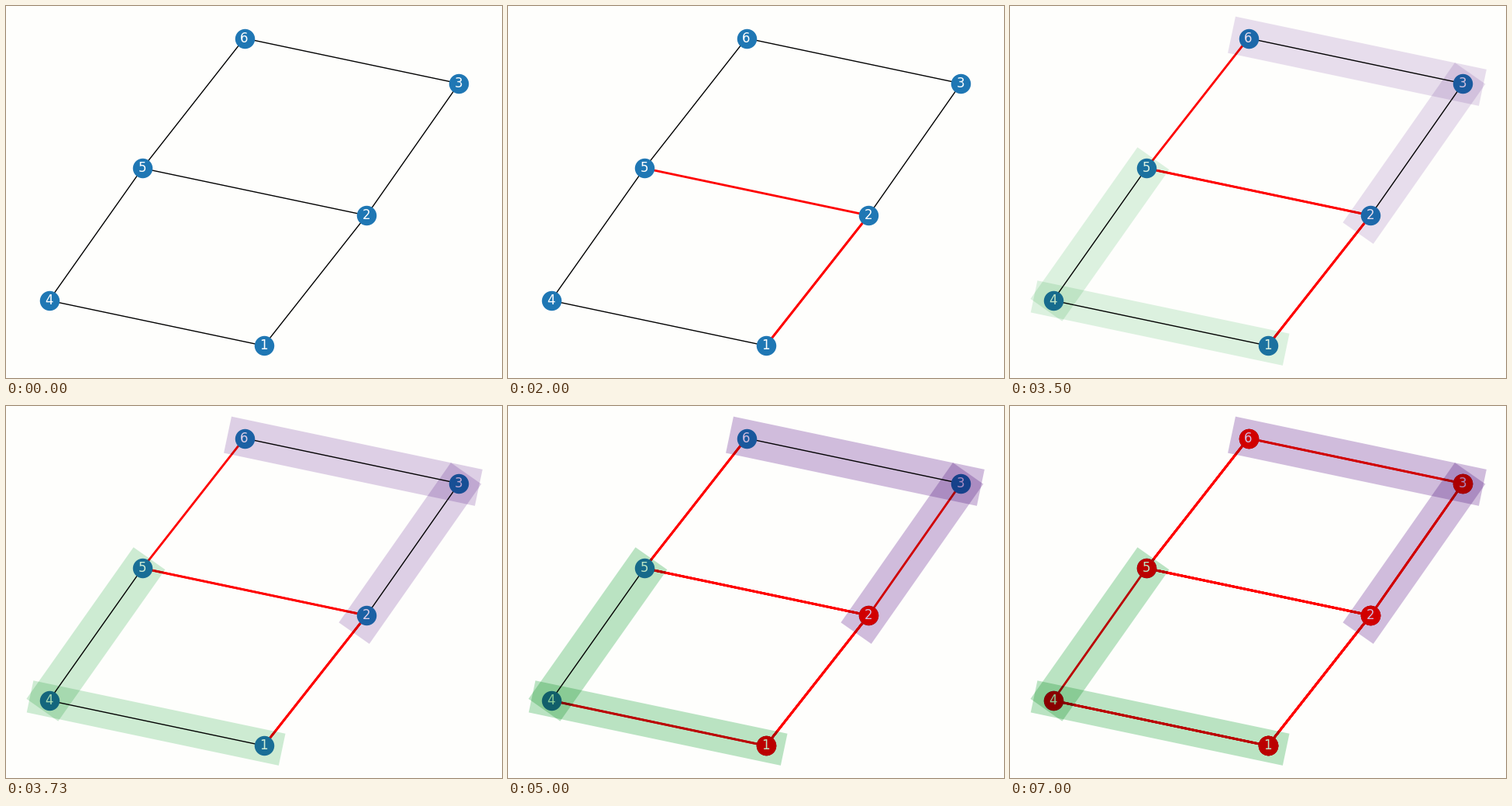
A matplotlib script that plays this animation: 640 px wide and 480 px high, repeating every 8000 ms.

```python
from itertools import combinations

import matplotlib.pyplot as plt
import numpy as np
from matplotlib.animation import FuncAnimation
from matplotlib.collections import LineCollection
from matplotlib.patches import Polygon

WIDTH, HEIGHT, DPI = 640, 480, 100
LOOP_MS, STEP_MS = 8000, 20
FADE_START, FADE_MS = 3000, 1000

PAPER, BLUE, GREEN, PURPLE = (np.array(rgb) / 255 for rgb in (
    (254, 254, 252), (31, 119, 180), (187, 228, 196), (209, 189, 223)))
RED, BLACK, WHITE = np.array([1, 0, 0]), np.zeros(3), np.ones(3)

NODES = {1: (332.7, 438.35), 2: (465.2, 270.2), 3: (584.46, 100),
         4: (55.54, 380), 5: (176, 209.4), 6: (307.55, 41.65)}

# One edge turns red each second, in this order.
EDGES = [(1, 2), (2, 5), (5, 6), (4, 1), (2, 3), (6, 3), (4, 5)]
EDGE_START = {edge: k for k, edge in enumerate(EDGES, 1)}
# A node turns red together with the last of its edges.
NODE_START = {n: max(EDGE_START[e] for e in EDGES if n in e) for n in NODES}

# Highlighter bands along edges: tint, width, overhang at either end.
BANDS = {(4, 1): (GREEN, 42, 25, 24), (4, 5): (GREEN, 50, 15, 15.5),
         (6, 3): (PURPLE, 48, 22, 26), (2, 3): (PURPLE, 48, 28, 16)}

fig = plt.figure(figsize=(WIDTH / DPI, HEIGHT / DPI), dpi=DPI, facecolor=PAPER)
ax = fig.add_axes([0, 0, 1, 1])
ax.set(xlim=(0, WIDTH), ylim=(HEIGHT, 0))
ax.axis("off")


def multiply(color, bands, fade):
    """Colour seen through the given bands, as with a highlighter pen."""
    for band in bands:
        color = color * (1 - fade * (1 - BANDS[band][0]))
    return color


def add_band(band, zorder):
    _, width, before, after = BANDS[band]
    start, end = (np.array(NODES[n]) for n in band)
    along = (end - start) / np.hypot(*(end - start))
    side = along[::-1] * (-1, 1) * width / 2
    start, end = start - along * before, end + along * after
    corners = [start - side, end - side, end + side, start + side]
    return ax.add_patch(Polygon(corners, lw=0, zorder=zorder))


def add_lines(zorder, clip=None):
    lines = LineCollection([], zorder=zorder)
    ax.add_collection(lines, autolim=False)
    if clip is not None:
        lines.set_clip_path(clip)
    return lines


def set_lines(lines, edges, second, bands=(), fade=0):
    """Thin black edges, with one red stroke more for every second passed."""
    red = [e for e in edges for _ in range(second - EDGE_START[e] + 1)]
    lines.set_segments([[NODES[a], NODES[b]] for a, b in edges + red])
    lines.set_linewidths([1] * len(edges) + [2] * len(red))
    lines.set_color([BLACK] * len(edges)
                    + [multiply(RED, bands, fade)] * len(red))


base_lines = add_lines(1)
shapes = {band: add_band(band, 2) for band in BANDS}
patches = [(shape, [band]) for band, shape in shapes.items()]
inner_lines = [(add_lines(3, shape), [e for e in EDGES if set(e) & set(band)],
                [band]) for band, shape in shapes.items()]

# Where two bands meet at a node, both tints apply.
for pair in combinations(BANDS, 2):
    a, b = pair
    if set(a) & set(b):
        overlap = add_band(a, 4)
        overlap.set_clip_path(shapes[b])
        patches.append((overlap, pair))
        inner_lines += [(add_lines(5, shapes[b]), [a], pair),
                        (add_lines(5, shapes[a]), [b], pair)]


def add_node(n):
    """Blue dot, red dot, label and the bands that cover them."""
    x, y = NODES[n]
    blue, red = (ax.scatter(x, y, s=300, zorder=z) for z in (6, 7))
    label = ax.text(x, y, str(n), size=12, family="DejaVu Sans",
                    ha="center", va="center", zorder=8)
    return blue, red, label, [band for band in BANDS if n in band]


node_artists = {n: add_node(n) for n in NODES}


def update(i):
    t = i * STEP_MS
    second = t // 1000
    fade = min(max((t - FADE_START) / FADE_MS, 0), 1)

    set_lines(base_lines, EDGES, second)
    for patch, bands in patches:
        patch.set_visible(fade > 0)
        patch.set_facecolor(multiply(PAPER, bands, fade))
    for lines, edges, bands in inner_lines:
        lines.set_visible(fade > 0)
        set_lines(lines, edges, second, bands, fade)

    for n, (blue, red, label, bands) in node_artists.items():
        blue.set_color(multiply(BLUE, bands, fade))
        red.set_color(multiply(RED, bands, fade))
        label.set_color(multiply(WHITE, bands, fade))
        strokes = second - NODE_START[n] + 1
        red.set_visible(strokes > 0)
        red.set_offsets([NODES[n]] * max(strokes, 1))


anim = FuncAnimation(fig, update, frames=LOOP_MS // STEP_MS, interval=STEP_MS,
                     init_func=lambda: None, repeat=True, repeat_delay=0,
                     blit=False)
plt.show()
```
